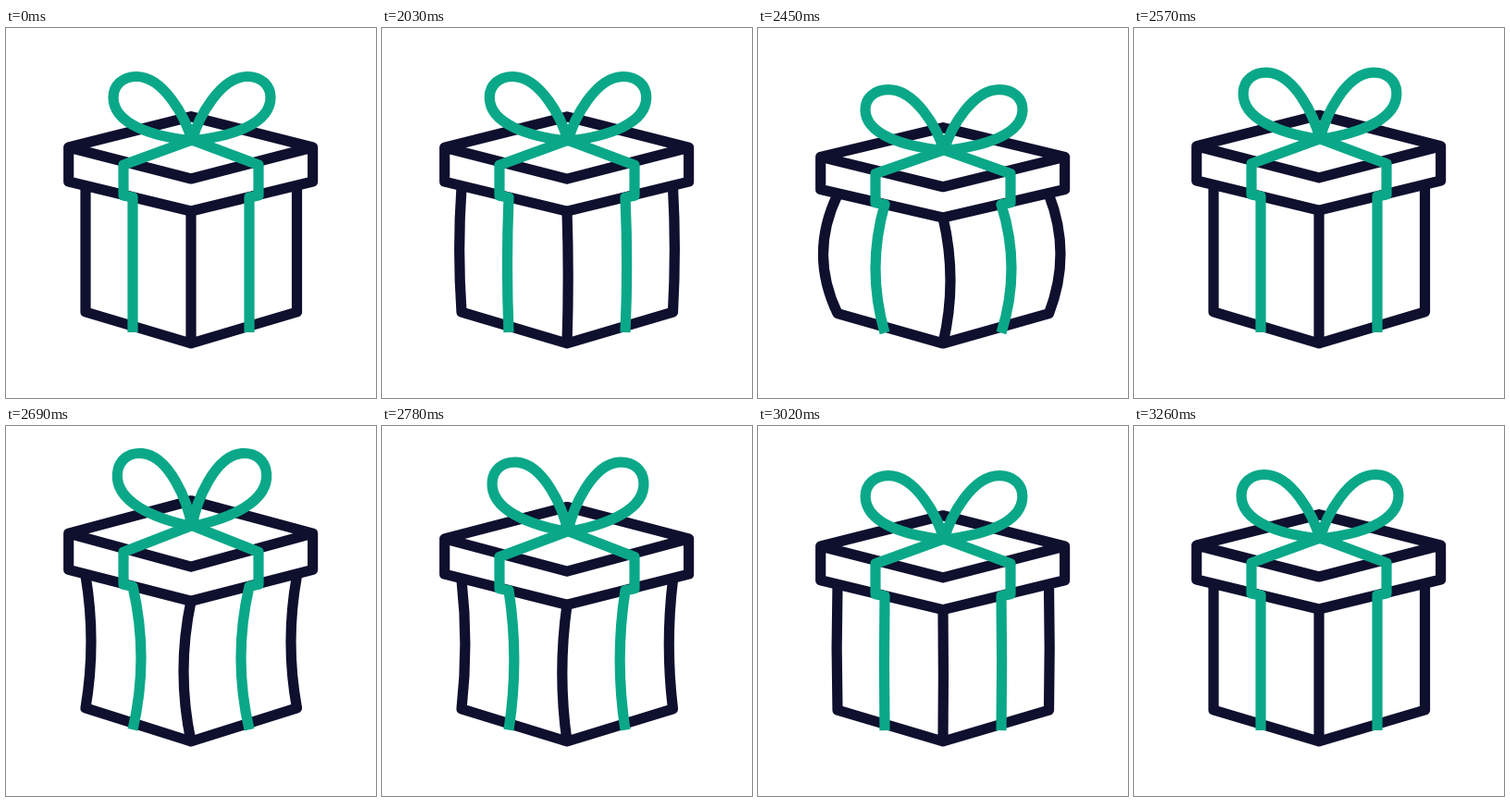
Animation, 400 px wide and 400 px high, one loop 3350 ms. Source, as an HTML page:

```html
<!DOCTYPE html>
<html lang="en">
<head>
<meta charset="utf-8">
<title>Gift box</title>
<style>
  html, body { margin: 0; width: 100%; height: 100%; overflow: hidden; background: #fff; }
  svg { display: block; width: 100vw; height: 100vh; }
  path { fill: none; stroke-width: 11.2; stroke-linejoin: round; vector-effect: non-scaling-stroke; }
  .box { stroke: #0f0f2e; stroke-linecap: round; }
  .ribbon { stroke: #0aa888; }
</style>
</head>
<body>
<svg viewBox="0 0 400 400">
  <g id="gift">
    <path class="box" id="body"/>
    <path class="box" d="M67.7 129 L200 95.7 L331.6 129 L200 163 Z V166 L200 198 L331.6 166 V129"/>
    <path class="ribbon" id="straps"/>
    <path class="ribbon" id="left"/>
    <path class="ribbon" id="right"/>
  </g>
</svg>
<script>
const LOOP = 3350, STEP = 30, START = 2030, FLOOR = 341, KNOT = [201, 122];

// time, squash of the whole box, bulge of the sides, lift of the bow in degrees
const KEYS = [
  [2000, 0, 0, 0],
  [2030, 0.001, 0.15, 0.3],
  [2210, 0.027, 0.92, 4.5],
  [2450, 0.049, 1, 0],
  [2690, -0.061, -1, 5],
  [2870, 0, -0.15, 1.4],
  [2970, 0.008, 0.1, 0],
  [3110, -0.004, -0.05, 0.6],
  [3260, 0, 0, 0]
];

const $ = id => document.getElementById(id);

// Slope at a key: flat at turning points, harmonic mean elsewhere
function slope(i, c) {
  if (i === 0 || i === KEYS.length - 1) return 0;
  const rate = j => (KEYS[j + 1][c] - KEYS[j][c]) / (KEYS[j + 1][0] - KEYS[j][0]);
  const a = rate(i - 1), b = rate(i);
  return a * b > 0 ? 2 * a * b / (a + b) : 0;
}

function valueAt(t, c) {
  const last = KEYS.length - 1;
  if (t <= KEYS[0][0] || t >= KEYS[last][0]) return 0;
  const i = KEYS.findIndex(k => k[0] > t) - 1;
  const [p, q] = [KEYS[i], KEYS[i + 1]];
  const d = q[0] - p[0], u = (t - p[0]) / d, v = 1 - u;
  return v * v * (1 + 2 * u) * p[c] + u * u * (3 - 2 * u) * q[c]
    + d * u * v * (v * slope(i, c) - u * slope(i + 1, c));
}

// Upright edge whose middle moves sideways by the bulge
function edge(x, top, bottom, bulge, out, inward) {
  const shift = bulge > 0 ? bulge * out : -bulge * inward;
  return `${x} ${top} Q${x + 2 * shift} ${(top + bottom) / 2} ${x} ${bottom}`;
}

function draw(t) {
  const [squash, bulge, lift] = [1, 2, 3].map(c => valueAt(t, c));

  $('gift').setAttribute('transform',
    `translate(0 ${FLOOR * squash}) scale(1 ${1 - squash})`);

  $('body').setAttribute('d',
    'M' + edge(86, 172, 307, bulge, -15.5, 6) +
    ` L200 ${FLOOR} L314.5 307` +
    ' M' + edge(314.5, 172, 307, bulge, 12.5, -6.5) +
    ' M' + edge(200, 198, FLOOR, bulge, 8, -8));

  $('straps').setAttribute('d',
    'M201 121 L127 148 V181 L' + edge(137, 183, 329, bulge, -10, 9) +
    ' M201 121 L273 148 V181 L' + edge(263, 183, 329, bulge, 11, -9));

  const at = `translate(${KNOT})`;
  $('left').setAttribute('transform', `${at} rotate(${lift})`);
  $('right').setAttribute('transform', `${at} rotate(${-lift})`);
}

// One loop of the bow, drawn from the knot; side is -1 or 1
function bowLoop(side) {
  const p = (x, y) => `${side * x} ${y}`;
  return `M0 0 C${p(7, -26)} ${p(31, -69.5)} ${p(60, -69.5)}` +
    ` C${p(75, -69.5)} ${p(85, -60)} ${p(85, -47)}` +
    ` C${p(85, -18)} ${p(43, -5)} 0 0`;
}
$('left').setAttribute('d', bowLoop(-1));
$('right').setAttribute('d', bowLoop(1));

const begin = performance.now();
function tick(now) {
  const t = Math.max(0, now - begin) % LOOP;
  draw(t < START ? 0 : START + Math.floor((t - START) / STEP) * STEP);
  requestAnimationFrame(tick);
}
draw(0);
requestAnimationFrame(tick);
</script>
</body>
</html>
```
